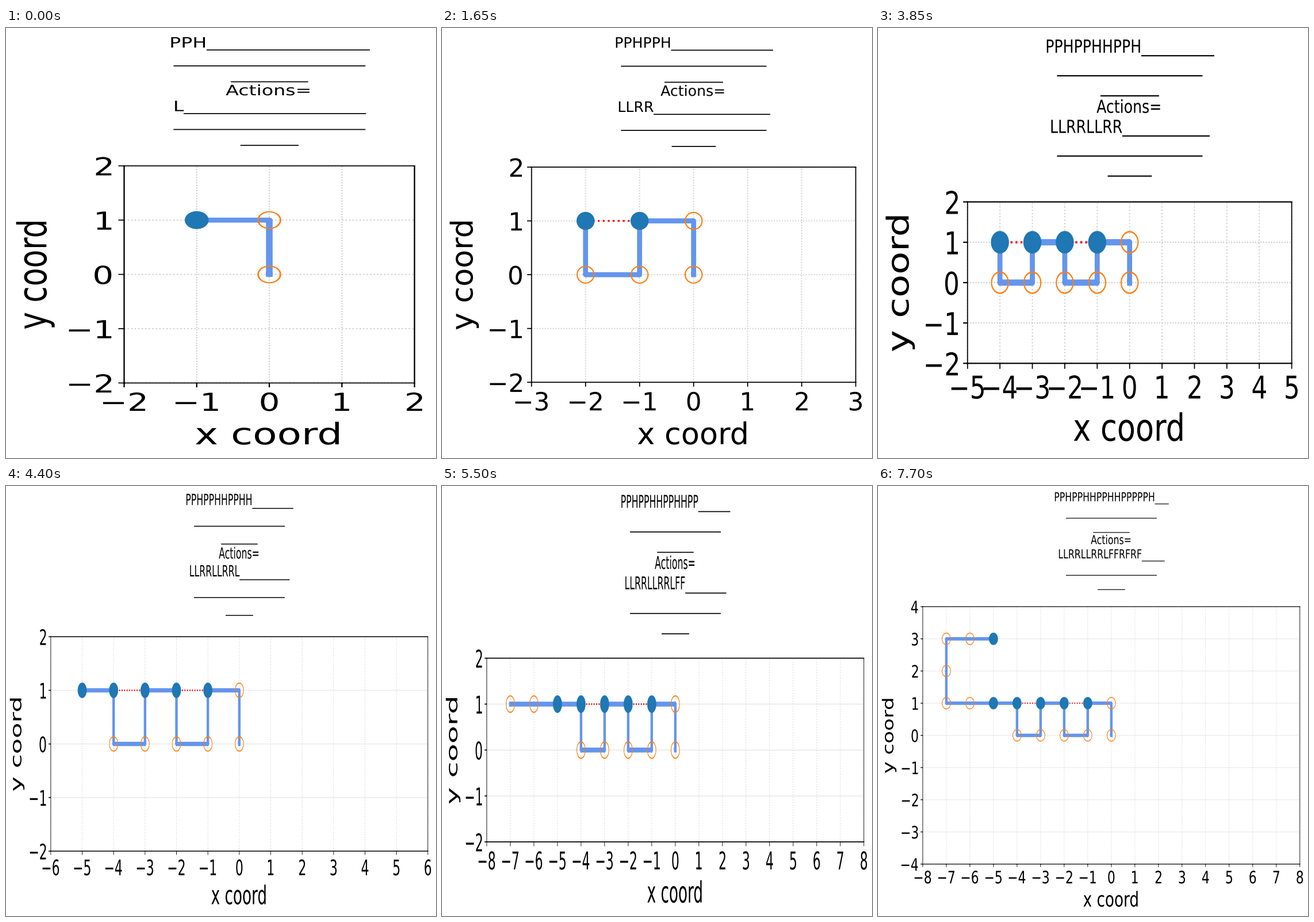
A matplotlib script that plays this animation: 748 by 748 pixels, repeating every 8000 ms.

```python
import numpy as np
import matplotlib.pyplot as plt
from matplotlib.animation import FuncAnimation
from matplotlib.patches import PathPatch
from matplotlib.path import Path
from matplotlib.textpath import TextPath
from matplotlib.transforms import Affine2D

plt.rcParams["font.family"] = "DejaVu Sans"
plt.rcParams["lines.scale_dashes"] = False

STAGE, DPI = 748, 100
STEP, TICK, LOOP = 550, 50, 8000
RESIDUES = "PPHPPHHPPHHPPPPPH"
MOVES = "LLRRLLRRLFFRFRF"
N_RES, N_MOVES, WRAP = 48, 46, 20
ADVANCE = {"P": .603, "H": .752, "L": .557, "R": .695, "F": .575}

LINE = 1.11           # thin line, in plot pixels
LEFT, RIGHT, BOTTOM = 98.9, 18, 84
LABEL_EM, TICK_EM = 33.33, 27.78
BACKBONE, HYDRO, POLAR = "cornflowerblue", "#1f77b4", "#ff7f0e"
GRID = "#c8c8c8"


def bar(x0, y0, x1, y1):
    return Path([(x0, y0), (x1, y0), (x1, y1), (x0, y1), (x0, y0)])


def hline(x0, x1, y, w=LINE):
    return bar(x0, y - w / 2, x1, y + w / 2)


def vline(x, y0, y1, w=LINE):
    return bar(x - w / 2, y0, x + w / 2, y1)


def circle(x, y, r):
    t = np.linspace(0, 2 * np.pi, 61)
    return np.column_stack([x + r * np.cos(t), y + r * np.sin(t)])


def disc(x, y, r):
    return Path(circle(x, y, r))


def ring(x, y, outer, inner):
    return Path(np.vstack([circle(x, y, outer), circle(x, y, inner)[::-1]]))


def text(s, em, x, y, ha=.5, turned=False):
    """Outline of s with its baseline at y; ha runs from 0 (left) to 1 (right)."""
    path = TextPath((0, 0), s, size=em)
    box = path.get_extents()
    t = Affine2D().translate(-(box.x0 + ha * box.width), 0)
    if turned:
        t.rotate_deg(90)
    return path.transformed(t.scale(1, -1).translate(x, y))


def fill(ax, paths, color, z):
    if paths:
        shape = Path.make_compound_path(*paths)
        ax.add_patch(PathPatch(shape, fc=color, ec="none", lw=0, zorder=z,
                               snap=False))


def fold(moves):
    pos, step = [(0, 0), (0, 1)], (0, 1)
    for m in moves:
        dx, dy = step
        step = {"L": (-dy, dx), "R": (dy, -dx), "F": step}[m]
        pos.append((pos[-1][0] + step[0], pos[-1][1] + step[1]))
    return pos


def contacts(pos, seq):
    """Neighbouring H residues that are not joined by the chain."""
    for i in range(len(pos)):
        for j in range(i + 2, len(pos)):
            gap = abs(pos[i][0] - pos[j][0]) + abs(pos[i][1] - pos[j][1])
            if seq[i] == seq[j] == "H" and gap == 1:
                yield pos[i], pos[j]


def title(seq, moves, mid, big):
    em, first, step, drop = (20, 24.7, 23.1, 4.3) if big else (16, 21.9, 17.8, 2.7)
    blank = em / 2
    paths = [text("Actions=", em, mid - 1.4, first + 3 * step)]
    for row, letters, total in ((0, seq, N_RES), (4, moves, N_MOVES)):
        head = sum(ADVANCE[c] for c in letters) * em
        blanks = (WRAP - len(letters), WRAP, total - 2 * WRAP)
        for i, n in enumerate(blanks):
            y = first + (row + i) * step
            lead = 0 if i else head
            x = mid - (lead + n * blank) / 2
            if lead:
                paths.append(text(letters, em, x + .098 * em, y, ha=0))
            paths.append(hline(x + lead - .2, x + lead + n * blank + .5, y + drop))
    return paths


def build(fig, k):
    seq, moves = RESIDUES[:k + 3], MOVES[:k + 1]
    pos = fold(moves)
    nx = max(2, max(abs(x) for x, _ in pos) + 1)
    ny = max(2, max(abs(y) for _, y in pos) + 1)

    # natural plot size; the axes limits stretch it onto the square stage
    big = nx > 5
    width = 360 if nx < 3 else 950 if big else 475
    top = 195.2 if big else 154.3
    right = width - RIGHT
    unit = (right - LEFT) / (2 * nx)
    base = top + 2 * ny * unit
    height = base + BOTTOM
    mid_x, mid_y = (LEFT + right) / 2, (top + base) / 2
    sx, sy = STAGE / width, STAGE / height
    pt = 72 / DPI

    ax = fig.add_axes([0, 0, 1, 1])
    ax.set_axis_off()
    ax.set_xlim(0, width)
    ax.set_ylim(height, 0)

    def at(p):
        return mid_x + p[0] * unit, mid_y - p[1] * unit

    def dotted(a, b, w, color, z):
        flat = a[1] == b[1]
        along, across = (sx, sy) if flat else (sy, sx)
        dash = w * along * pt
        ax.plot((a[0], b[0]), (a[1], b[1]), color=color, zorder=z,
                lw=w * across * pt, ls=(0, (dash, 1.65 * dash)),
                dash_capstyle="butt", snap=False)

    ink = title(seq, moves, mid_x, big)
    ink += [hline(LEFT - LINE / 2, right + LINE / 2, y) for y in (top, base)]
    ink += [vline(x, top, base) for x in (LEFT, right)]
    for i in range(-nx, nx + 1):
        x = at((i, 0))[0]
        dotted((x, base), (x, top), LINE, GRID, 1)
        ink += [vline(x, base, base + 4.86),
                text(str(i).replace("-", "\u2212"), TICK_EM, x, base + 31.2)]
    for i in range(-ny, ny + 1):
        y = at((0, i))[1]
        dotted((LEFT, y), (right, y), LINE, GRID, 1)
        ink += [hline(LEFT - 4.86, LEFT, y),
                text(str(i).replace("-", "\u2212"), TICK_EM, LEFT - 10.7,
                     y + 10.7, ha=1)]
    ink += [text("x coord", LABEL_EM, mid_x - 1.7, height - 15.3),
            text("y coord", LABEL_EM, 33.8, mid_y + 1, turned=True)]
    fill(ax, ink, "black", 5)

    for a, b in contacts(pos, seq):
        dotted(at(a), at(b), 2.08, "red", 2)

    pts = [at(p) for p in pos]
    half = 2.78
    chain = [disc(x, y, half) for x, y in pts[1:-1]]
    chain += [bar(x - half, y - half, x + half, y + half)
              for x, y in (pts[0], pts[-1])]
    for (xa, ya), (xb, yb) in zip(pts, pts[1:]):
        if ya == yb:
            chain.append(hline(min(xa, xb), max(xa, xb), ya, 2 * half))
        else:
            chain.append(vline(xa, min(ya, yb), max(ya, yb), 2 * half))
    fill(ax, chain, BACKBONE, 3)

    fill(ax, [disc(*p, 10) for p, c in zip(pts, seq) if c == "H"], HYDRO, 4)
    fill(ax, [ring(*p, 10, 8.65) for p, c in zip(pts, seq) if c == "P"],
         POLAR, 4)
    return ax


fig = plt.figure(figsize=(STAGE / DPI, STAGE / DPI), dpi=DPI, facecolor="white")
scenes = [build(fig, k) for k in range(len(MOVES))]


def update(i):
    now = min(i * TICK // STEP, len(scenes) - 1)
    for k, ax in enumerate(scenes):
        ax.set_visible(k == now)
    return scenes


anim = FuncAnimation(fig, update, frames=LOOP // TICK, interval=TICK,
                     init_func=lambda: update(0), repeat=True, blit=False)
plt.show()
```
